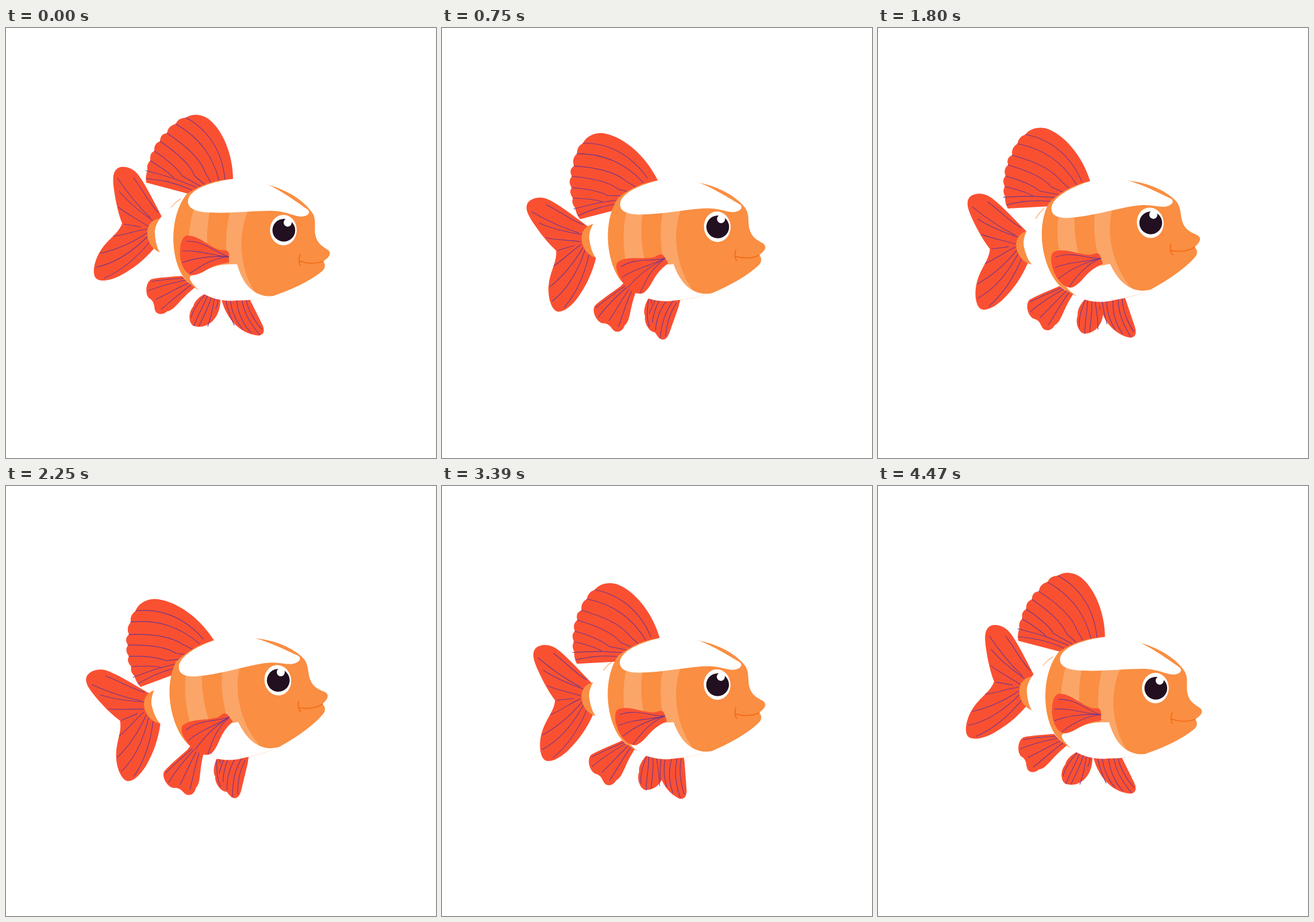
An HTML page with a canvas for the animation above (4500 ms loop, 748 by 748 pixels).

```html
<!DOCTYPE html>
<html lang="en">
<head>
<meta charset="utf-8">
<title>Goldfish</title>
<style>
html, body { margin: 0; width: 100%; height: 100%; overflow: hidden; background: #fff; }
canvas { display: block; width: 748px; height: 748px; }
</style>
</head>
<body>
<canvas id="stage" width="748" height="748"></canvas>
<script>
const ctx = document.getElementById('stage').getContext('2d');
const LOOP = 4500, FLAP = 1500, STEP = 30;
const ORANGE = '#fa8e42', LIGHT = '#fba668', RED = '#fa5032', PURPLE = '#6b368c';
const MOUTH = '#f26a14', DARK = '#220f20', WHITE = '#fff';

// Each fin: pivot, share of the flap angle, outline and rays.
const fin = (x, y, share, outline, rays) =>
  ({ x, y, share, outline: new Path2D(outline), rays: new Path2D(rays) });

const dorsal = fin(362, 292, 1.08,
  `M395 264 C395 222 378 178 352 158 C340 150 324 148 313 156
   Q300 156 295 167 Q282 170 280 183 Q268 184 268 197 Q257 201 258 214
   Q249 218 251 231 Q244 236 246 248 Q242 258 244 269 L316 288 L350 300 L395 285 Z`,
  `M313 156 C350 176 376 212 381 264 M295 167 C336 190 360 222 371 267
   M280 183 C312 204 338 228 346 250 L357 270 M268 197 C296 216 320 236 328 257 L345 272
   M258 214 C280 228 300 246 306 257 L338 275 M251 231 C266 240 282 250 292 261
   M243 248 C262 253 280 258 292 262 L331 277
   M244 262 C266 264 290 267 323 282`);

const tail = fin(285, 362, 0.95,
  `M271 328 C259 306 246 278 232 258 C222 243 206 239 196 243 C184 249 186 266 188 282
   C191 304 196 325 202 340 C196 357 179 366 166 385 C153 404 149 428 157 436
   C166 443 185 438 200 430 C222 418 240 404 258 383 L272 360 Z`,
  `M194 261 C210 285 230 310 251 330 M222 261 C238 281 248 304 265 321
   M197 284 C213 304 234 320 255 335 M196 312 C212 325 230 333 247 345
   M205 341 L234 346 M187 362 C208 360 226 352 245 350
   M164 392 C192 386 222 372 246 356 M157 416 C193 409 224 385 247 362
   M171 435 C204 421 232 394 250 372`);

const pelvic = fin(333, 440, 1.15,
  `M308 431 C286 433 264 434 253 437 C242 443 242 464 249 470
   C262 478 255 488 262 495 C268 500 276 497 280 493 C294 491 300 474 329 451
   L350 440 L330 425 Z`,
  `M322 434 C298 436 276 437 253 441 M322 437 C294 442 272 447 248 457
   M325 440 C302 450 282 462 261 472 M328 443 C306 457 288 475 270 489`);

const anal = fin(362, 452, 1.25,
  `M351 460 C337 466 327 476 326 484 C317 494 317 513 326 518
   C349 526 375 506 373 468 L378 445 L352 445 Z`,
  `M346 464 C336 476 326 488 322 504 M351 464 C344 484 333 500 327 518
   M358 465 C353 486 342 504 336 518 M363 466 C360 488 357 502 351 519
   M369 466 C369 476 368 482 365 488`);

const rear = fin(401, 459, -2.15,
  `M374 468 C380 500 404 533 440 535 C450 533 450 525 446 516 L424 472 L410 450 L378 452 Z`,
  `M382 470 C384 488 391 504 397 517 M390 470 C391 490 400 510 412 524
   M401 470 C402 493 412 515 426 530 M410 470 C413 495 427 517 441 533
   M417 470 C421 492 434 512 445 524`);

const pectoral = fin(392, 398, 1.15,
  `M388 393 C386 384 379 388 371 386 C350 378 335 361 315 361
   C303 363 302 386 303 398 C305 416 315 431 326 430 C347 427 354 411 388 408 Z`,
  `M388 398 C362 390 345 370 314 371 M388 398 C360 396 335 386 307 388
   M388 398 C360 396 332 399 307 408 M388 398 C362 400 342 411 320 427`);

const body = new Path2D(
  `M314 289 C342 270 370 263 398 263 C421 264 440 267 457 273 C492 283 518 301 531 319
   C541 331 536 345 538 359 C541 375 551 380 560 386 C567 392 563 399 551 406
   C556 409 556 417 551 422 C533 438 498 455 465 466 C440 472 421 474 400 474
   C365 473 331 459 312 437 C287 408 281 332 314 289 Z`);
const peduncle = new Path2D('M271 331 C251 332 244 347 246 362 C248 376 257 386 267 390 Z');
const rump = new Path2D('M311 287 L286 313 C268 326 258 344 259 358 C260 374 264 386 269 392 L318 444 L330 360 Z');
const rumpEdge = new Path2D('M287 312 Q295 302 304 297 Q295 303 287 312 Z');
const stripes = new Path2D(
  `M327 314 C317 345 315 385 324 432 L356 420 C348 380 348 350 355 316 Z
   M391 316 C382 345 381 378 386 415 L406 425 C412 448 422 462 440 468
   C414 440 396 370 423 314 Z`);
const cap = new Path2D(
  `M398 262 C371 265 328 275 318 295 C313 308 321 317 342 320 C382 324 424 318 458 318
   C488 318 495 326 512 328 C526 328 530 321 525 316 C505 302 482 285 457 273
   C440 265 420 259 398 262 Z`);
const belly = new Path2D(
  `M322 431 C344 425 358 411 389 411 L402 411 C408 432 420 460 450 466
   Q462 467 467 466 C444 471 423 474 400 474 C375 477 352 468 340 460 C322 445 316 434 322 431 Z`);
const mouth = new Path2D('M512 394 C509 401 509 408 512 413 M510 405 Q532 413 552 406');

function fill(path, color) {
  ctx.fillStyle = color;
  ctx.fill(path);
}

function stroke(path, color, width) {
  ctx.strokeStyle = color;
  ctx.lineWidth = width;
  ctx.stroke(path);
}

function disc(x, y, rx, ry, color) {
  ctx.beginPath();
  ctx.ellipse(x, y, rx, ry, 0, 0, Math.PI * 2);
  ctx.fillStyle = color;
  ctx.fill();
}

// Positive degrees turn counter-clockwise.
function turn(x, y, degrees) {
  ctx.translate(x, y);
  ctx.rotate(-degrees * Math.PI / 180);
  ctx.translate(-x, -y);
}

function drawFin(part, flap) {
  ctx.save();
  turn(part.x, part.y, flap * part.share);
  fill(part.outline, RED);
  stroke(part.rays, PURPLE, 1.1);
  ctx.restore();
}

const wave = s => (1 - Math.cos(Math.PI * s)) / 2;

function bodyTilt(t) {
  const s = t / (LOOP / 2);
  return 10 * (s < 1 ? s + s * s - s * s * s : 1 - wave(Math.pow(s - 1, 0.9)));
}

function eyeOpening(t) {
  const near = Math.max(0, 1 - Math.abs(t - 1185) / 165);
  return 1 - 0.82 * wave(near);
}

function drawEye(open) {
  ctx.save();
  ctx.translate(482.5, 351.5);
  ctx.scale(1, open);
  disc(0, 0, 23.2, 26.5, WHITE);
  disc(0.8, 0.3, 19.8, 19.8, DARK);
  disc(7.5, -13, 7, 7.2, WHITE);
  ctx.restore();
}

function draw(t) {
  const flap = 23.3 * wave(2 * t / FLAP);
  ctx.fillStyle = WHITE;
  ctx.fillRect(0, 0, 748, 748);
  ctx.save();
  turn(400, 400, bodyTilt(t));
  [tail, pelvic, anal, rear].forEach(part => drawFin(part, flap));
  fill(peduncle, ORANGE);
  fill(rump, WHITE);
  stroke(rumpEdge, ORANGE, 0.8);
  drawFin(dorsal, flap);
  fill(body, ORANGE);
  ctx.save();
  ctx.clip(body);
  fill(stripes, LIGHT);
  ctx.restore();
  fill(cap, WHITE);
  fill(belly, WHITE);
  drawEye(eyeOpening(t));
  stroke(mouth, MOUTH, 1.7);
  drawFin(pectoral, flap);
  ctx.restore();
}

ctx.lineCap = 'round';
ctx.lineJoin = 'round';
const start = performance.now();
function tick() {
  const t = (performance.now() - start) % LOOP;
  draw(Math.floor(t / STEP) * STEP);
  requestAnimationFrame(tick);
}
tick();
</script>
</body>
</html>
```
